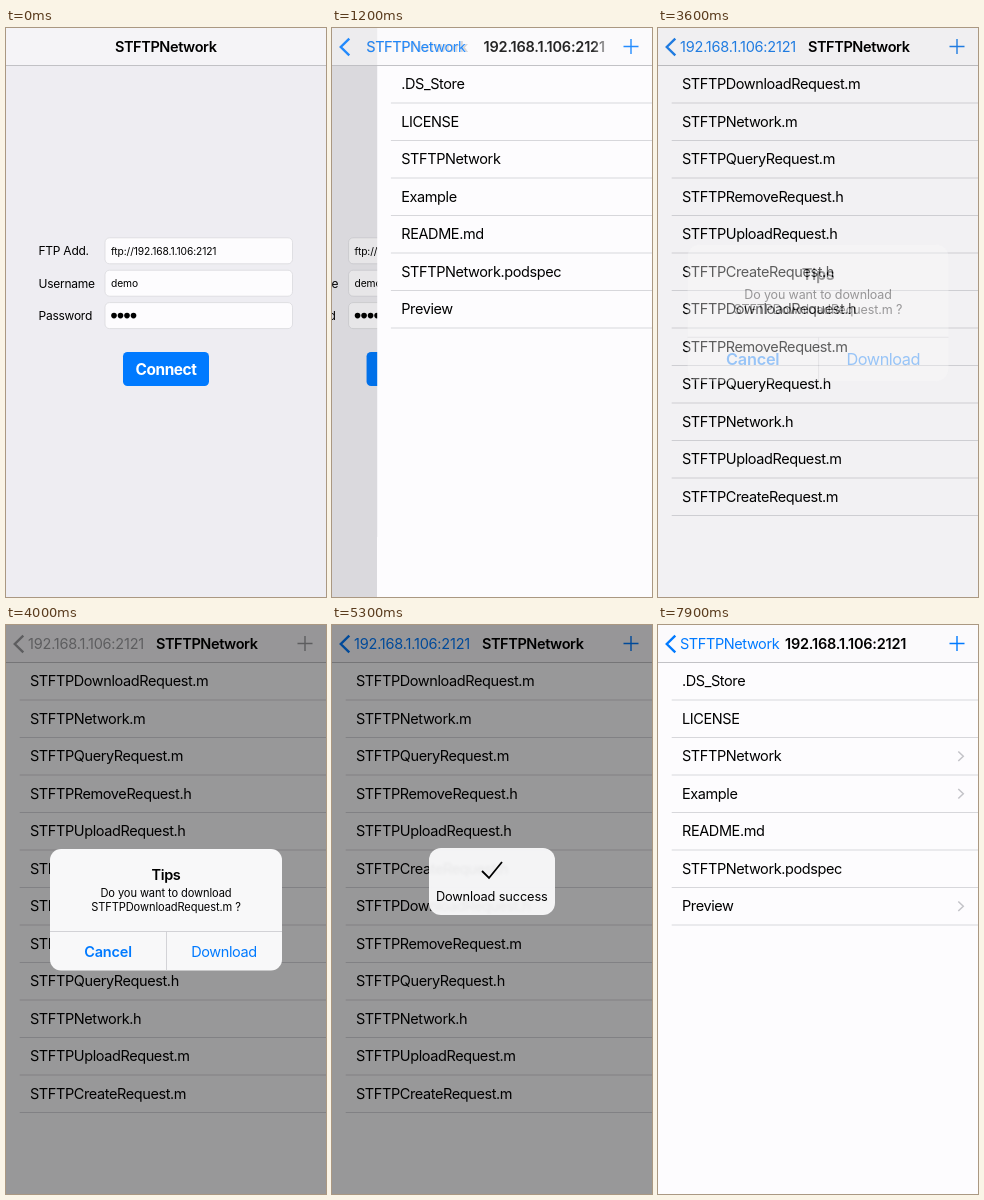
Animation of 320 by 569 pixels, one loop 8000 ms. Source, as an HTML page:

```html
<!DOCTYPE html>
<html lang="en">
<head>
<meta charset="utf-8">
<title>FTP client demo</title>
<style>
  html, body { margin: 0; width: 100%; height: 100%; overflow: hidden; background: #fdfcfe; }
  #stage {
    position: relative; width: 320px; height: 569px; overflow: hidden;
    font: 14.5px Inter, Roboto, sans-serif; letter-spacing: -.4px;
    --push: cubic-bezier(.2, .8, .2, 1);
  }
  svg { position: absolute; left: 0; top: 0; display: block; }
  text { white-space: pre; }
  .num { letter-spacing: -.2px; }
  .semi { font-weight: 600; }
  .mid { text-anchor: middle; }
  .label { font-size: 12px; letter-spacing: -.25px; }
  .value { font-size: 10.24px; letter-spacing: -.1px; }
  .note { font-size: 11.1px; letter-spacing: -.1px; }
  .line { stroke: #d3d3d7; stroke-width: .9; }

  /* every part shares one 8 s clock */
  .a { animation: 8s var(--push) infinite both; }
  .lin { animation-timing-function: linear; }

  /* page pushes at 1034 and 2404 ms, pop at 7120 ms */
  #form { animation-name: formMove; }
  #formShade { animation-name: formShade; }
  #host { animation-name: hostMove; }
  #hostShade { animation-name: hostShade; }
  #sub { animation-name: subMove; }
  #subRows { animation-name: subRows; animation-timing-function: step-end; }
  @keyframes formMove { 0%, 12.925% { transform: none } 19.175%, 100% { transform: translateX(-96px) } }
  @keyframes formShade { 0%, 12.925% { opacity: 0 } 19.175%, 100% { opacity: .1 } }
  @keyframes hostMove {
    0%, 12.925% { transform: translateX(320px) }
    19.175%, 30.05% { transform: translateX(0) }
    36.3%, 89% { transform: translateX(-96px) }
    95.25%, 100% { transform: translateX(0) }
  }
  @keyframes hostShade { 0%, 30.05% { opacity: 0 } 36.3%, 89% { opacity: .1 } 95.25%, 100% { opacity: 0 } }
  @keyframes subMove {
    0%, 30.05% { transform: translateX(320px) }
    36.3%, 89% { transform: translateX(0) }
    95.25%, 100% { transform: translateX(320px) }
  }
  @keyframes subRows { 0% { opacity: 0 } 35.6%, 100% { opacity: 1 } }

  /* navigation bar */
  #tint { animation-name: tint; }
  #tools { animation-name: tools; }
  #homeTitle { animation-name: homeTitle; }
  #homeBack { animation-name: homeBack; }
  #hostTitle { animation-name: hostTitle; }
  #hostBack { animation-name: hostBack; }
  #subTitle { animation-name: subTitle; }
  @keyframes tint { 0%, 44.6% { color: #007aff } 46.5%, 56% { color: #9a9a9e } 59%, 100% { color: #007aff } }
  @keyframes tools { 0%, 12.925% { opacity: 0 } 19.175%, 100% { opacity: 1 } }
  @keyframes homeTitle {
    0%, 12.925% { transform: translateX(109px); opacity: 1 }
    19.175%, 100% { transform: translateX(22px); opacity: 0 }
  }
  @keyframes homeBack {
    0%, 12.925% { transform: translateX(109px); opacity: 0 }
    19.175%, 30.05% { transform: translateX(22px); opacity: 1 }
    36.3%, 89% { transform: translateX(-85px); opacity: 0 }
    95.25%, 100% { transform: translateX(22px); opacity: 1 }
  }
  @keyframes hostTitle {
    0%, 12.925% { transform: translateX(301px); opacity: 0 }
    19.175%, 30.05% { transform: translateX(127px); opacity: 1 }
    36.3%, 89% { transform: translateX(22px); opacity: 0 }
    95.25%, 100% { transform: translateX(127px); opacity: 1 }
  }
  @keyframes hostBack {
    0%, 30.05% { transform: translateX(90px); opacity: 0 }
    36.3%, 89% { transform: translateX(22px); opacity: 1 }
    95.25%, 100% { transform: translateX(127px); opacity: 0 }
  }
  @keyframes subTitle {
    0%, 30.05% { transform: translateX(240px); opacity: 0 }
    36.3%, 89% { transform: translateX(150px); opacity: 1 }
    95.25%, 100% { transform: translateX(270px); opacity: 0 }
  }

  /* dimming, alert and progress panels */
  #dim { position: absolute; inset: 0; background: #000; animation-name: dim; }
  #alert { transform-origin: 160px 284.5px; animation-name: alert; }
  @keyframes dim {
    0%, 4.375% { opacity: 0 } 6.25%, 10.625% { opacity: .4 } 12.5%, 44.6% { opacity: 0 }
    48.5%, 55.75% { opacity: .4 } 60%, 62% { opacity: 0 } 63.875%, 80.75% { opacity: .4 }
    82.625%, 100% { opacity: 0 }
  }
  @keyframes alert {
    0%, 44.6% { transform: scale(1.2); opacity: 0 }
    49%, 55.75% { transform: none; opacity: 1 }
    60%, 100% { transform: none; opacity: 0 }
  }
  .hud { position: absolute; left: 160px; top: 256px; border-radius: 12px; }
  .panel { background: rgba(252, 252, 253, .92); }
  .glass { backdrop-filter: blur(1.6px); }
  .wait { width: 56px; height: 56px; margin: -28px; animation-name: waitScale, waitFade; }
  .done { width: 125.5px; height: 66.5px; margin: -33.25px -62.75px; animation-name: doneScale, doneFade; }
  .glass.done { animation-name: doneScale; }
  @keyframes waitScale {
    0%, 4.375% { transform: scale(.667) } 6.25%, 10.625% { transform: none } 12.5%, 100% { transform: scale(.769) }
  }
  @keyframes waitFade { 0%, 4.375% { opacity: 0 } 6.25%, 10.625% { opacity: 1 } 12.5%, 100% { opacity: 0 } }
  @keyframes doneScale {
    0%, 62% { transform: scale(.667); visibility: hidden }
    62.01% { visibility: visible }
    63.875%, 80.75% { transform: none }
    82.62% { visibility: visible }
    82.625%, 100% { transform: scale(.769); visibility: hidden }
  }
  @keyframes doneFade { 0%, 62% { opacity: 0 } 63.875%, 80.75% { opacity: 1 } 82.625%, 100% { opacity: 0 } }
  .ring {
    position: absolute; left: 12px; top: 12px; width: 32px; height: 32px; border-radius: 50%;
    background: conic-gradient(transparent, #000);
    -webkit-mask: radial-gradient(circle, transparent 13.5px, #000 14px);
    mask: radial-gradient(circle, transparent 13.5px, #000 14px);
    animation: spin 1s linear infinite;
  }
  @keyframes spin { to { transform: rotate(360deg) } }
</style>
</head>
<body>
<div id="stage">
  <svg width="320" height="569" viewBox="0 0 320 569">
    <defs>
      <linearGradient id="edge" gradientUnits="userSpaceOnUse" x1="260" y1="0" x2="282" y2="0">
        <stop stop-color="#fff"/><stop offset="1" stop-color="#000"/>
      </linearGradient>
      <mask id="fade" maskUnits="userSpaceOnUse" x="0" y="0" width="320" height="38">
        <rect width="320" height="38" fill="url(#edge)"/>
      </mask>
    </defs>

    <g id="form" class="a">
      <rect width="320" height="569" fill="#eeedf2"/>
      <g id="fields"></g>
      <rect x="117" y="324" width="86" height="34" rx="4.5" fill="#007aff"/>
      <text class="mid" x="160" y="346.6" fill="#fff" font-size="15.4" font-weight="700">Connect</text>
      <rect id="formShade" class="a" width="420" height="569"/>
    </g>
    <g id="host" class="a">
      <rect width="320" height="569" fill="#fdfcfe"/>
      <g id="hostRows"></g>
      <rect id="hostShade" class="a" width="320" height="569"/>
    </g>
    <g id="sub" class="a">
      <rect width="320" height="569" fill="#fdfcfe"/>
      <g id="subRows" class="a"></g>
    </g>

    <rect width="320" height="37.5" fill="#faf9fb" fill-opacity=".6"/>
    <path d="M0 37.5H320" stroke="#bcbcc0" stroke-width=".9"/>
    <g class="semi" mask="url(#fade)">
      <text id="homeTitle" class="a" y="24">STFTPNetwork</text>
      <text id="hostTitle" class="a num" y="24">192.168.1.106:2121</text>
      <text id="subTitle" class="a" y="24">STFTPNetwork</text>
    </g>
    <g id="tint" class="a lin" fill="currentColor">
      <text id="homeBack" class="a" y="24">STFTPNetwork</text>
      <text id="hostBack" class="a num" y="24">192.168.1.106:2121</text>
      <g id="tools" class="a" fill="none" stroke="currentColor">
        <path d="M17.3 10.7L8.8 19L17.3 27.3" stroke-width="2.4"/>
        <path d="M291.5 18.5H306.5M299 11V26" stroke-width="1.4"/>
      </g>
    </g>
  </svg>

  <div id="dim" class="a lin"></div>

  <svg width="320" height="569" viewBox="0 0 320 569">
    <g id="alert" class="a">
      <rect x="44" y="224" width="232" height="121.5" rx="11" fill="#f8f8f9"/>
      <path d="M44 306.5H276M160.5 306.5V345.5" stroke="#cfcfd3" stroke-width=".9"/>
      <text class="mid semi" x="160" y="255.3">Tips</text>
      <text class="mid note" x="160" y="272.4">Do you want to download</text>
      <text class="mid note" x="160" y="286.2">STFTPDownloadRequest.m ?</text>
      <g fill="#007aff">
        <text class="mid semi num" x="102" y="331.5">Cancel</text>
        <text class="mid" x="218" y="331.5">Download</text>
      </g>
    </g>
  </svg>

  <div class="hud panel wait a lin"><div class="ring"></div></div>
  <div class="hud glass done a lin"></div>
  <div class="hud panel done a lin">
    <svg width="125.5" height="66.5">
      <path d="M53 23L60 30L73 14" fill="none" stroke="#000" stroke-width="1.8"/>
      <text class="mid" x="62.75" y="53.2" font-size="12.8" style="letter-spacing:-.15px">Download success</text>
    </svg>
  </div>
</div>

<script>
  const put = (id, html) => { document.getElementById(id).innerHTML = html; };

  // A trailing slash marks a folder, which gets a chevron.
  const rows = names => names.map((name, i) => {
    const mid = 56.25 + 37.5 * i;
    const arrow = name.endsWith('/')
      ? `<path d="M300.3 ${mid - 4.8}l5 4.8l-5 4.8" fill="none" stroke="#c3c3c8" stroke-width="1.5"/>` : '';
    return `<text x="24" y="${mid + 5.2}">${name.replace('/', '')}</text>${arrow}
      <path class="line" d="M13.7 ${mid + 18.75}H320"/>`;
  }).join('');

  const dots = [0, 1, 2, 3].map(i => `<circle cx="${108 + 6.5 * i}" cy="287.6" r="2.8"/>`).join('');
  const fields = [['FTP Add.', 'ftp://192.168.1.106:2121'], ['Username', 'demo'], ['Password', '']];

  put('fields', fields.map(([label, value], i) => {
    const mid = 222.8 + 32.4 * i;
    return `<text class="label" x="32.5" y="${mid + 4.4}">${label}</text>
      <rect x="99" y="${mid - 13}" width="187.5" height="26" rx="4.5" fill="#fdfcfe" stroke="#dadade" stroke-width=".8"/>
      <text class="value" x="105" y="${mid + 3.7}">${value}</text>`;
  }).join('') + dots);

  put('hostRows', rows(['.DS_Store', 'LICENSE', 'STFTPNetwork/', 'Example/', 'README.md',
    'STFTPNetwork.podspec', 'Preview/']));

  put('subRows', rows(['DownloadRequest.m', 'Network.m', 'QueryRequest.m', 'RemoveRequest.h',
    'UploadRequest.h', 'CreateRequest.h', 'DownloadRequest.h', 'RemoveRequest.m', 'QueryRequest.h',
    'Network.h', 'UploadRequest.m', 'CreateRequest.m'].map(name => 'STFTP' + name)));
</script>
</body>
</html>
```
